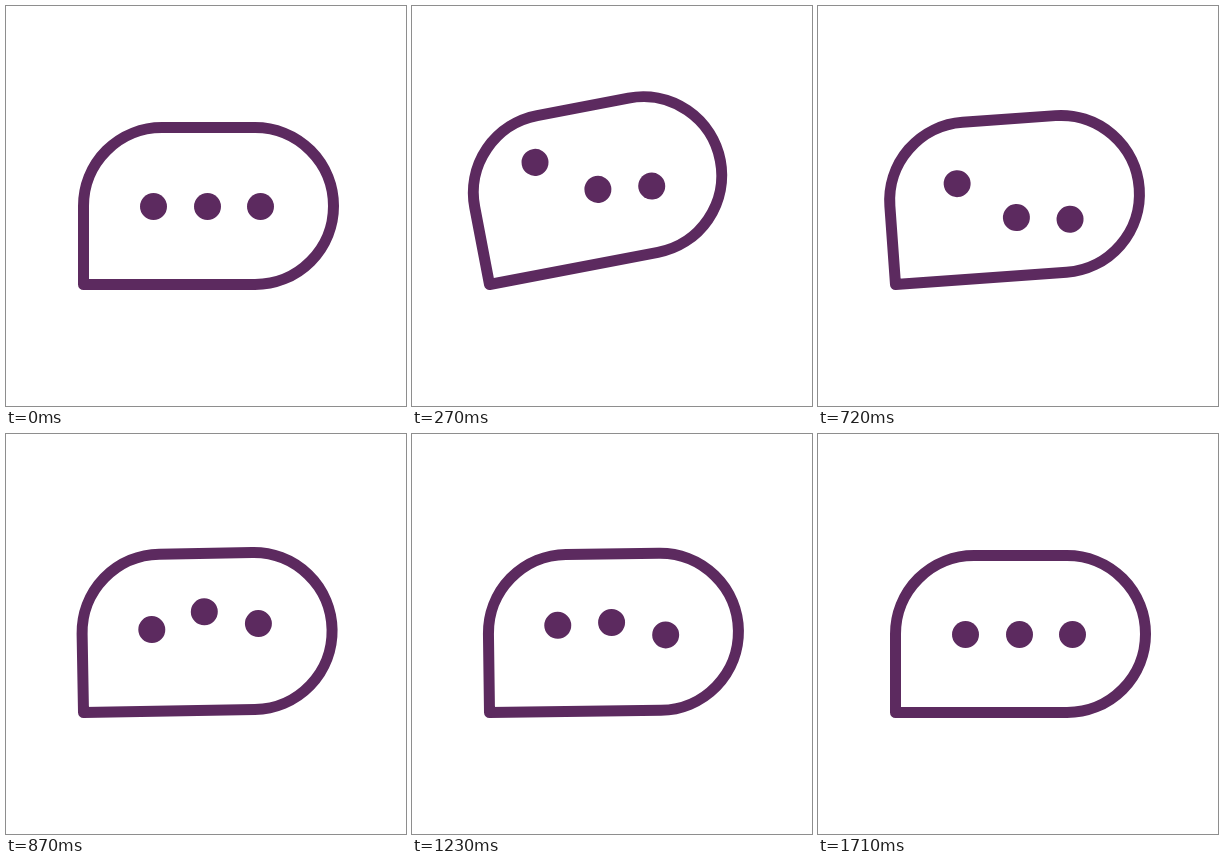
These frames come from a looping animation (400x400 px, 3800 ms). An HTML page:

```html
<!DOCTYPE html>
<html lang="en">
<head>
<meta charset="utf-8">
<title>Typing bubble</title>
<style>
  html, body { margin: 0; width: 100%; height: 100%; overflow: hidden; background: #fff; }
  svg { display: block; width: 100%; height: 100%; }
</style>
</head>
<body>
<svg viewBox="0 0 400 400">
  <g id="bubble" fill="#5c2a5f">
    <path d="M77.5 278.5V200A78.5 78.5 0 0 1 156 121.5H249A78.5 78.5 0 0 1 249 278.5Z"
      fill="none" stroke="#5c2a5f" stroke-width="11" stroke-linejoin="round"/>
    <circle class="dot" cx="147.5" cy="200.5" r="13.5"/>
    <circle class="dot" cx="201.5" cy="200.5" r="13.5"/>
    <circle class="dot" cx="254.5" cy="200.5" r="13.5"/>
  </g>
</svg>
<script>
  const LOOP = 3800, STEP = 30, STAGGER = 90;

  // Each key: time in ms, bubble angle in degrees, dot offset in pixels.
  const keys = [
    [0, 0, 0],
    [130, 9.8, 15],
    [305, -13, -38.5],
    [397, -13.2, -39.5],
    [575, 8.9, 32],
    [750, -5.1, -22],
    [975, 2.3, 11.2],
    [1150, -1, -10.5],
    [1400, 0, -0.8],
    [1530, 0, 0]
  ];
  const ANGLE = 1, OFFSET = 2;

  function valueAt(time, column) {
    if (time <= 0) return 0;
    const next = keys.findIndex(key => key[0] > time);
    if (next < 0) return 0;
    const a = keys[next - 1], b = keys[next];
    const ease = (1 - Math.cos(Math.PI * (time - a[0]) / (b[0] - a[0]))) / 2;
    return a[column] + (b[column] - a[column]) * ease;
  }

  const bubble = document.getElementById("bubble");
  const dots = document.querySelectorAll(".dot");

  function draw(now) {
    const time = Math.floor((now % LOOP) / STEP) * STEP;
    bubble.setAttribute("transform", `rotate(${valueAt(time, ANGLE)} 77.5 278.5)`);
    dots.forEach((dot, i) => {
      const y = valueAt(time - i * STAGGER, OFFSET);
      dot.setAttribute("transform", `translate(${0.07 * y} ${y})`);
    });
  }

  const start = performance.now();
  function tick() {
    draw(performance.now() - start);
    requestAnimationFrame(tick);
  }
  tick();
</script>
</body>
</html>
```
